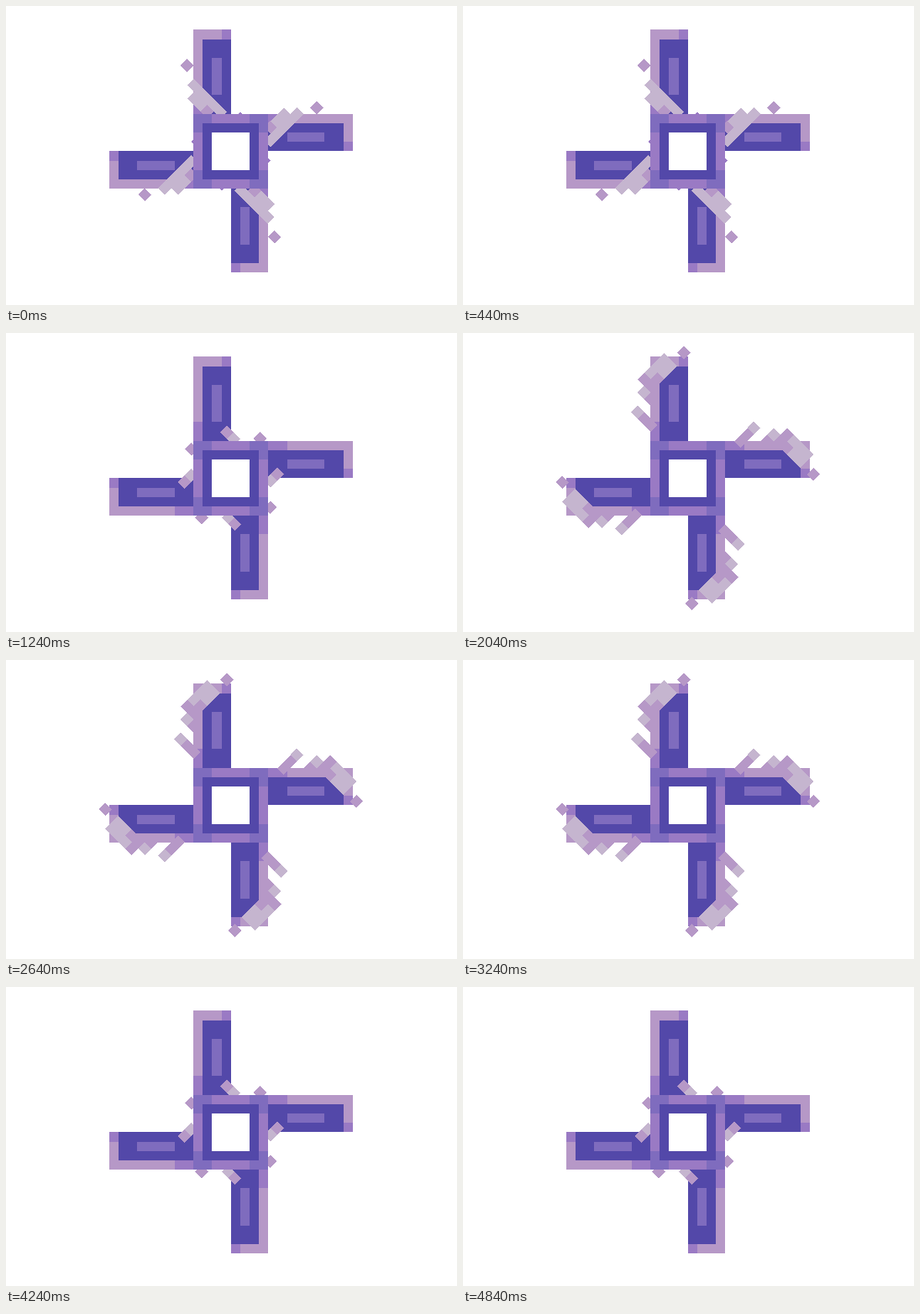
An HTML page that plays this animation: 537 by 357 pixels, repeating every 5000 ms.

```html
<!DOCTYPE html>
<html lang="en">
<head>
<meta charset="utf-8">
<title>Pinwheel</title>
<style>
  html, body { margin: 0; width: 100%; height: 100%; overflow: hidden; background: #fff; }
  svg { display: block; width: 537px; height: 357px; }
</style>
</head>
<body>
<svg viewBox="0 0 537 357" shape-rendering="crispEdges">
  <g id="wheel" transform="translate(267.75 173.38)"></g>
</svg>
<script>
const CELL = 11.15;
const HALF = CELL / Math.SQRT2;
const LENGTH = 13, WIDTH = 4;
const LOOP = 5000, FIRST_CHANGE = 40, STEP = 200;
const DARK = '#5348a9', BLUE = '#7f6cbe', PURPLE = '#9a7ac4', LILAC = '#b698c7', PALE = '#c5b5cf';
const RISE = -1, FALL = 1;

const box = (color, x, y, w, h) =>
  `<rect x="${x * CELL}" y="${y * CELL}" width="${w * CELL}" height="${h * CELL}" fill="${color}"/>`;

const square = (color, radius) => box(color, -radius, -radius, 2 * radius, 2 * radius);

// Sparks sit on a lattice turned by 45 degrees, slightly off centre.
const diamond = (color, i, j) => {
  const x = (i - 0.6) * HALF, y = (j + 0.02) * HALF;
  return `<path fill="${color}" d="M${x} ${y - HALF}l${HALF} ${HALF}l${-HALF} ${HALF}l${-HALF} ${-HALF}z"/>`;
};

// A diagonal run of sparks, going right and either up or down.
const streak = (color, i, j, slope, count) =>
  Array.from({ length: count }, (_, n) => diamond(color, i + n, j + n * slope)).join('');

const fourfold = content =>
  [0, 1, 2, 3].map(turn => `<g transform="rotate(${turn * 90})">${content}</g>`).join('');

const arm =
  box(LILAC, -WIDTH, -LENGTH, WIDTH, LENGTH) +
  box(PURPLE, -1, -LENGTH, 1, 1) +
  box(PURPLE, -WIDTH, -6, 1, 2) +
  box(DARK, 1 - WIDTH, 1 - LENGTH, WIDTH - 1, LENGTH - 1) +
  box(BLUE, -2, -10, 1, 4);

const hub =
  square(BLUE, WIDTH) +
  fourfold(box(PURPLE, -2, -WIDTH, 4, 1)) +
  square(DARK, 3) +
  square('#fff', 2);

const nearHub =
  diamond(LILAC, 5, -6) +
  streak(PALE, 0, -7, FALL, 2) +
  diamond(LILAC, 0, -7);

const atTip =
  diamond(LILAC, 0, -19) +
  streak(LILAC, -6, -15, RISE, 2) + streak(PALE, -5, -16, RISE, 3) +
  streak(LILAC, -5, -14, RISE, 2) + streak(PALE, -3, -16, RISE, 2) +
  streak(LILAC, -6, -13, FALL, 2) + diamond(PALE, -6, -13) +
  streak(LILAC, -7, -10, FALL, 3) + diamond(PALE, -7, -10);

const atBase =
  diamond(LILAC, -6, -13) +
  diamond(PURPLE, 2, -5) +
  streak(PALE, -5, -10, FALL, 5) +
  streak(PALE, -5, -8, FALL, 2) + diamond(LILAC, -3, -6);

const poses = [nearHub, atTip, atBase];

document.getElementById('wheel').innerHTML =
  fourfold(arm) +
  poses.map(sparks => `<g class="pose">${fourfold(sparks)}</g>`).join('') +
  hub;

const layers = document.querySelectorAll('.pose');
const start = performance.now();

function draw(now) {
  const time = Math.max(0, now - start) % LOOP;
  const step = Math.floor((time - FIRST_CHANGE) / STEP);
  const current = (step + poses.length) % poses.length;
  layers.forEach((layer, i) => layer.setAttribute('visibility', i === current ? 'visible' : 'hidden'));
  requestAnimationFrame(draw);
}
draw(start);
</script>
</body>
</html>
```
